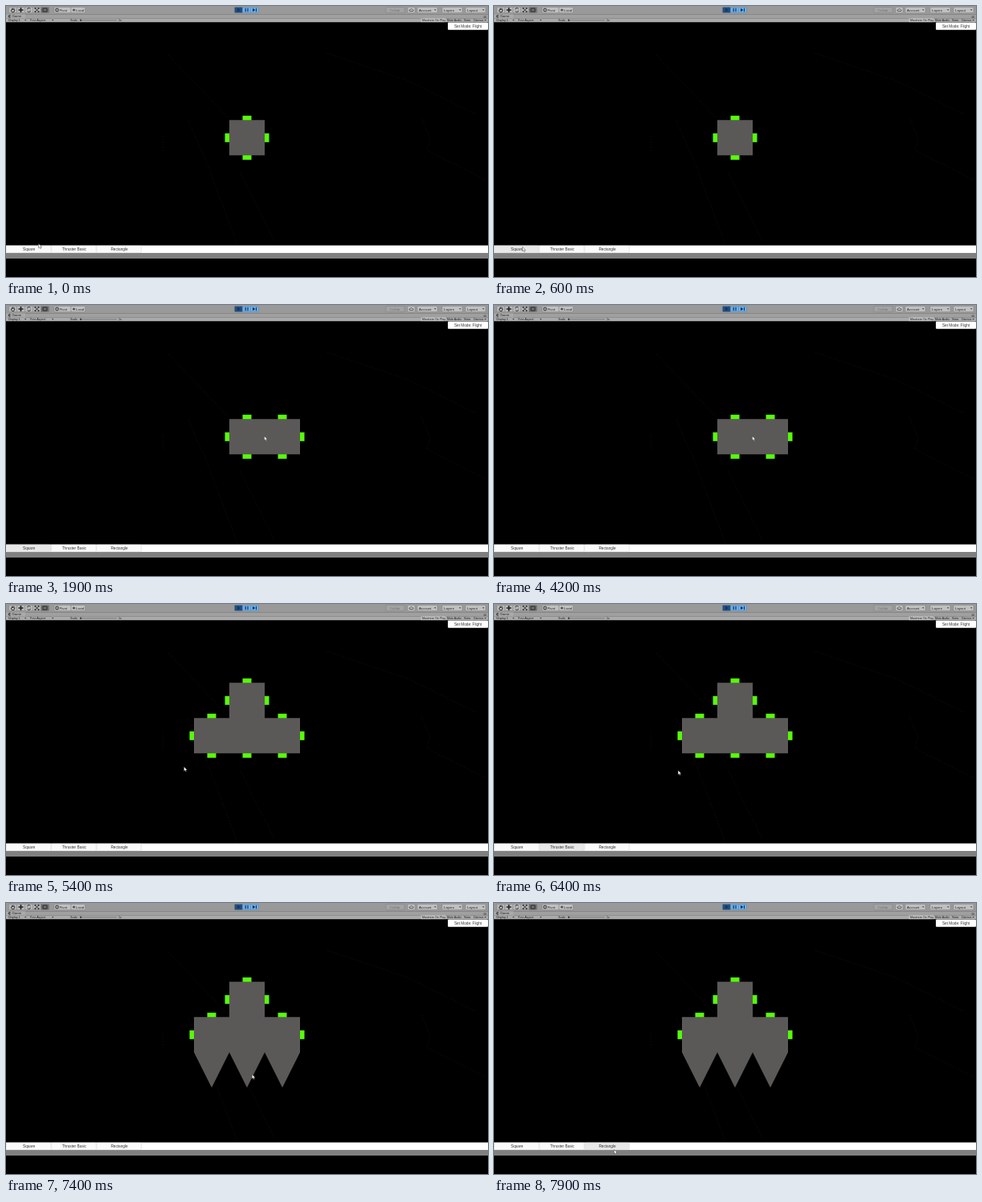
An HTML page that plays this animation: 600x338 px, repeating every 8 s.

```html
<!DOCTYPE html>
<html lang="en">
<head>
<meta charset="utf-8">
<title>Ship builder</title>
<style>
html, body { margin: 0; width: 100%; height: 100%; overflow: hidden; background: #000; }
svg { display: block; width: 100%; height: 100%; }
text { font-family: "Liberation Sans", Arial, sans-serif; font-size: 4.3px; fill: #222; }
.ui { font-size: 4.7px; fill: #333; text-anchor: middle; }
.row { font-size: 3.6px; fill: #1c1c1c; }
</style>
</head>
<body>
<svg id="stage" viewBox="0 0 600 338">
  <rect width="600" height="338"/>
  <g fill="none" stroke="#181818" stroke-width=".8" stroke-dasharray="1 2.5">
    <path d="M202 61L276 139M291 207L334 293M400 59L500 93L585 135"/>
    <path d="M227 143L248 191L288 297M195 162V182M517 140L528 165L524 180L597 217"/>
  </g>
  <g id="chrome"></g>
  <g id="buttons"></g>
  <g id="ship"></g>
  <path id="cursor" d="M0 0V5.4L1.3 4.3L2.2 6.2L3.1 5.8L2.3 4H4Z" fill="#fff" stroke="#222" stroke-width=".4"/>
</svg>
<script>
const LOOP = 8000, STEP = 100, CELL = 44, LEFT = 234, TOP = 98.3, SLOT = 11;
const GREY = '#5b5958', GREEN = '#58fa0a';
const $ = id => document.getElementById(id);

const rect = (x, y, w, h, fill, extra = '') =>
  `<rect x="${x}" y="${y}" width="${w}" height="${h}" fill="${fill}" ${extra}/>`;
const label = (x, y, s, extra = '') => `<text x="${x}" y="${y}" ${extra}>${s}</text>`;
const path = (d, extra = '') =>
  `<path d="${d}" fill="none" stroke="#222" stroke-width=".9" ${extra}/>`;
const arrow = (x, y) => `<path d="M${x} ${y}h2.4l-1.2 1.6z" fill="#333"/>`;
const pill = (x, w, fill = '#c0c0c0') =>
  rect(x, 1.4, w, 7.2, fill, 'rx="1" stroke="#777" stroke-width=".4"');

function drawChrome() {
  let s = rect(0, 0, 600, 10.2, '#999') + rect(0, 10.2, 600, 5, '#a0a0a0') +
    rect(0, 15.2, 600, 5, '#aaa') + rect(0, 10.4, 24, 5, '#aaa');

  // transform tools
  for (let i = 0; i < 5; i++) s += pill(3.5 + i * 10, 10, i === 4 ? '#707070' : '#b8b8b8');
  s += path('M6.5 4.8V6.5L8 7.6H9.8L11 4.8M7.5 5V3M8.8 5V2.6M10 5V3') +
    path('M15.5 5H21.5M18.5 2V8', 'style="stroke-width:1.6"') +
    path('M26.3 4.2A2.4 2.4 0 0 1 30.5 3.6M30.7 5.8A2.4 2.4 0 0 1 26.5 6.4') +
    path('M36 2.5L41 7.5M41 2.5L36 7.5M36 4V2.5H37.5M39.5 2.5H41V4M41 6V7.5H39.5M37.5 7.5H36V6') +
    path('M46 3H51V7H46Z');
  s += pill(60, 21) + pill(81, 17.5) +
    path('M62 3.3H65V6.7H62Z') + label(66.5, 6.6, 'Pivot') +
    '<circle cx="84.5" cy="5" r="1.6" fill="#555"/>' + label(87, 6.6, 'Local');

  // playback
  s += pill(284.5, 10, '#1d4f86') + pill(294.5, 10, '#66b0f4') + pill(304.5, 10, '#66b0f4') +
    '<path d="M288 2.8L292 5L288 7.2ZM307 2.8L310.5 5L307 7.2ZM311 2.8h1v4.4h-1zM297.6 2.8h1.2v4.4h-1.2zM300.4 2.8h1.2v4.4h-1.2z" fill="#16365a"/>';

  // right-hand menus
  s += pill(473, 23, '#a3a3a3') + label(478, 6.6, 'Collab', 'opacity=".4"') +
    pill(500, 9) + path('M503 6.5H506.5A1 1 0 0 0 506 4.6A1.6 1.6 0 0 0 503 4.7A.9 .9 0 0 0 503 6.5', 'opacity=".7"');
  [[512, 'Account'], [543, 'Layers'], [572, 'Layout']].forEach(([x, name]) => {
    s += pill(x, 25) + label(x + 2, 6.6, name) + arrow(x + 21, 4.2);
  });

  // game view header
  s += path('M5.4 11.6A1.5 1.5 0 1 0 5.4 14.2M3.5 12.9H5.5') +
    label(7.5, 14.3, 'Game') + path('M594.5 13H598M594.5 14.3H598', 'style="stroke-width:.5"');
  const row = (x, t) => label(x, 19, t, 'class="row"');
  s += row(3, 'Display 1') + arrow(23, 17) + row(30, 'Free Aspect') + arrow(57, 17) +
    row(80, 'Scale') + path('M92 17.8H138', 'style="stroke:#555;stroke-width:.6"') +
    '<circle cx="93" cy="17.8" r="1.2" fill="#444"/>' + row(140, '1x') +
    rect(516.5, 15.3, 31, 4.8, '#c0c0c0') + row(518, 'Maximize On Play') +
    row(549, 'Mute Audio') + row(570, 'Stats') + row(582, 'Gizmos') + arrow(595.5, 17);

  // mode button and lower strip
  s += rect(550, 20.6, 50, 9.2, '#fff', 'rx="1"') +
    label(575, 27, 'Set Mode: Flight', 'class="ui"') +
    rect(0, 298.6, 600, 9.4, '#fff') + rect(0, 308, 600, 7, '#808080');
  $('chrome').innerHTML = s;
}

// name, time highlighted, time released
const buttons = [['Square', 200, 4200], ['Thruster Basic', 5500, 6600], ['Rectangle', 7800, LOOP]];

function drawButtons(t) {
  $('buttons').innerHTML = buttons.map(([name, on, off], i) => {
    const x = i * 56.2 + .4;
    const fill = t >= on && t < off ? '#e8e8e8' : '#fafafa';
    return rect(x, 299.1, 55.6, 8.6, fill, 'rx="1.2" stroke="#d4d4d4" stroke-width=".5"') +
      label(x + 28.2, 305.4, name, 'class="ui"');
  }).join('');
}

// column, row, time placed
const cells = [[1, 1, 0], [2, 1, 1600], [0, 1, 5400], [1, 0, 5400]];
const tips = [[0, 2, 6600], [1, 2, 6800], [2, 2, 7100]];
const sides = [[0, -1], [0, 1], [-1, 0], [1, 0]];

function drawShip(t) {
  const live = list => list.filter(p => t >= p[2]);
  const squares = live(cells), spikes = live(tips), all = squares.concat(spikes);
  const taken = (c, r) => all.some(p => p[0] === c && p[1] === r);
  const corner = (c, r) => `M${LEFT + c * CELL} ${TOP + r * CELL}h${CELL}`;
  let slots = '', hull = '';
  for (const [c, r] of squares) {
    for (const [dx, dy] of sides) {
      if (taken(c + dx, r + dy)) continue;
      const x = LEFT + (c + .5 + dx / 2) * CELL, y = TOP + (r + .5 + dy / 2) * CELL;
      slots += rect(x - SLOT / 2, y - SLOT / 2, SLOT, SLOT, GREEN);
    }
    hull += corner(c, r) + `v${CELL}h${-CELL}z`;
  }
  for (const [c, r] of spikes) hull += corner(c, r) + `l${-CELL / 2} ${CELL}z`;
  $('ship').innerHTML = slots + `<path d="${hull}" fill="${GREY}"/>`;
}

// time, x, y
const track = [
  [0, 40.5, 296.5], [500, 36, 300.5], [900, 32, 300], [1400, 326.5, 161.5],
  [1600, 326.5, 162], [1800, 325, 163.2], [1900, 321.5, 163.5], [5300, 321.5, 163.5],
  [5400, 221.5, 203], [5500, 84, 302], [6100, 84, 302], [6500, 256, 190],
  [6600, 257, 190], [6800, 301, 190], [7000, 345, 190.7], [7200, 345, 190.7],
  [7900, 149.5, 307.5], [8000, 149.5, 307.5]
];

function cursorAt(t) {
  const i = track.findIndex(k => k[0] > t);
  const [t0, x0, y0] = track[i - 1], [t1, x1, y1] = track[i];
  const u = (t - t0) / (t1 - t0), e = u * u * (3 - 2 * u);
  return [x0 + (x1 - x0) * e, y0 + (y1 - y0) * e];
}

let last = -1;
function draw(now) {
  const t = Math.floor((now % LOOP) / STEP) * STEP;
  if (t === last) return;
  last = t;
  const [x, y] = cursorAt(t);
  drawShip(t);
  drawButtons(t);
  $('cursor').setAttribute('transform', `translate(${x} ${y})`);
}

drawChrome();
draw(0);
const start = performance.now();
(function tick() {
  draw(performance.now() - start);
  requestAnimationFrame(tick);
})();
</script>
</body>
</html>
```
